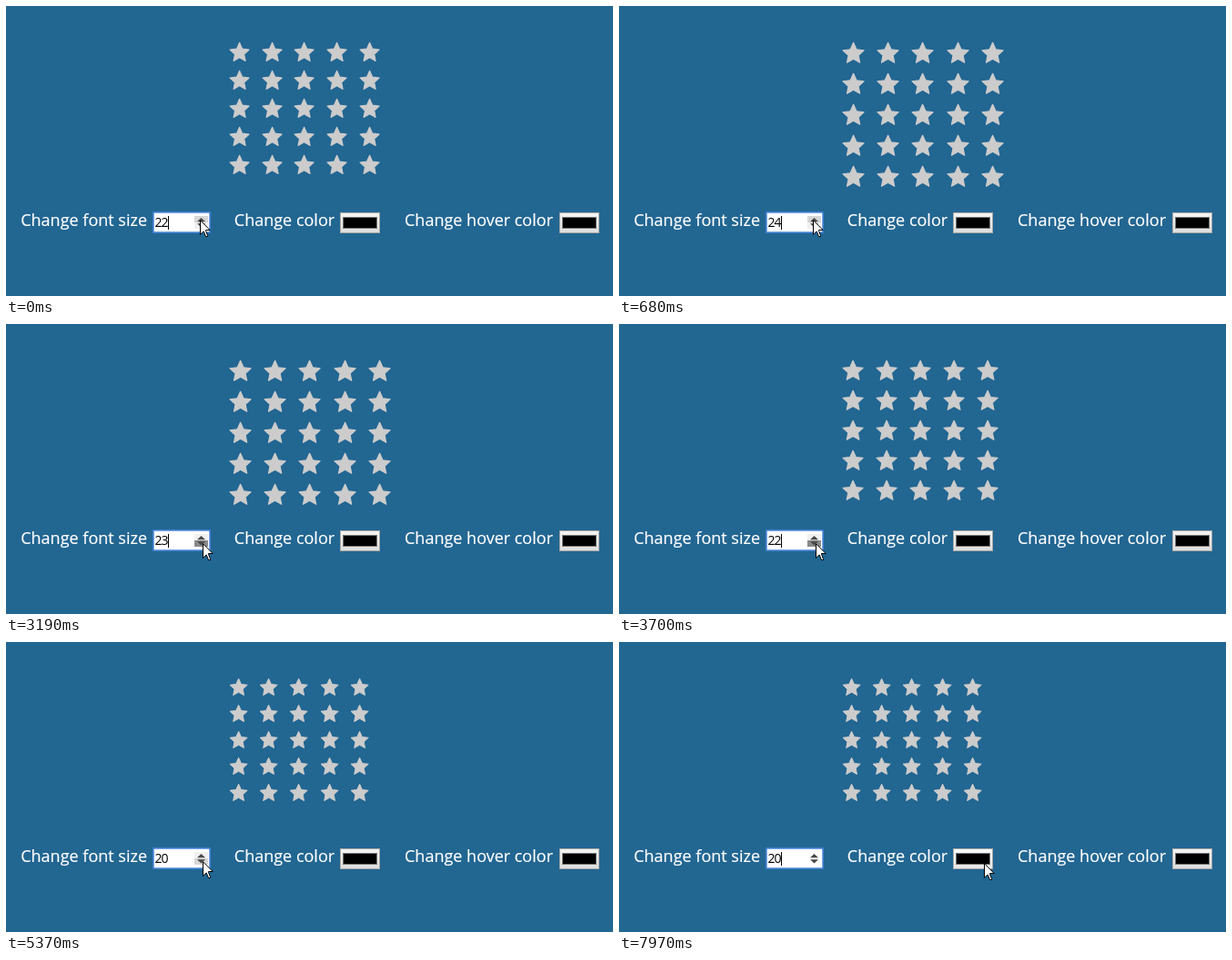
Recreate the animation shown at these times as an HTML page. Size 667 by 319 pixels, loop 8 s.

```html
<!DOCTYPE html>
<html lang="en">
<head>
<meta charset="utf-8">
<title>Star grid settings</title>
<style>
  html, body { margin: 0; width: 100%; height: 100%; overflow: hidden; background: #226692; }
  svg { display: block; width: 100%; height: 100%; }
  text { font-family: "Open Sans", "Noto Sans", sans-serif; white-space: pre; }
  .label { font-size: 18px; fill: #fff; stroke: #fff; stroke-width: .2px; }
  .value { font-size: 14px; letter-spacing: -1px; fill: #000; }
</style>
</head>
<body>
<svg viewBox="0 0 667 319">
  <defs>
    <linearGradient id="face" x2="0" y2="1">
      <stop offset="0" stop-color="#f4f4f3"/>
      <stop offset="1" stop-color="#dededc"/>
    </linearGradient>
    <linearGradient id="faceHover" x2="0" y2="1">
      <stop offset="0" stop-color="#fafaf9"/>
      <stop offset="1" stop-color="#e8e8e6"/>
    </linearGradient>
    <g id="swatch">
      <rect x=".5" y=".5" width="43" height="22" stroke="#a9a9a8"/>
      <rect x="3.5" y="5.5" width="37" height="12" fill="#000" stroke="#777"/>
    </g>
    <path id="star"/>
  </defs>

  <g id="stars" fill="#ccc" stroke="#ccc" stroke-width=".05" stroke-linejoin="round"></g>

  <text class="label" x="16.2" y="242">Change font size</text>
  <text class="label" x="250.8" y="242">Change color</text>
  <text class="label" x="438" y="242">Change hover color</text>

  <rect x="162" y="227" width="62" height="22" fill="#fff" stroke="#4a87de" stroke-width="1.5"/>
  <text class="value" id="value" x="163.4" y="243"></text>
  <rect id="caret" x="178" y="231" width="1" height="15"/>
  <rect id="upper" x="207" y="231" width="15" height="7"/>
  <rect id="lower" x="207" y="238" width="15" height="7"/>
  <path d="M210 237.2L214.5 233 219 237.2ZM210 239.3H219L214.5 243.5Z" fill="#484848"/>

  <use id="color" href="#swatch" x="367" y="227"/>
  <use href="#swatch" x="608" y="227" fill="url(#face)"/>

  <path id="cursor" fill="#fff" stroke="#000"
    d="M.5 .8V16.3L4.2 12.9 6.5 18.5H8.5V17.3L6.5 12.4V11.5H11.2Z"/>
</svg>
<script>
const LOOP = 8000, HOLD = 140, BLINK = 535;
const TO_LOWER = 2640;                        // pointer drops to the lower button
const LEAVE = 6960, HOP = 144, HOPS = 7;      // pointer travels to the swatch
const $ = id => document.getElementById(id);
const each = (count, make) => Array.from({ length: count }, (_, i) => make(i));

const clicks = [
  ...each(2, i => ({ start: 110 + 430 * i, by: 1 })),
  ...each(4, i => ({ start: 3170 + 530 * i, by: -1 })),
];
const valueAt = t => clicks.reduce((v, c) => t >= c.start ? v + c.by : v, 22);
const lastClick = t => clicks.reduce((s, c) => t >= c.start ? c.start : s, 0);

// Five-pointed star about one unit wide, with its top near 0.
const R = 0.505;
$('star').setAttribute('d', 'M' + each(10, i => {
  const r = i % 2 ? R * 0.48 : R, a = i * Math.PI / 5;
  return [r * Math.sin(a), R + 0.015 - r * Math.cos(a)].map(n => n.toFixed(4));
}).join('L') + 'Z');

const stars = each(25, () => {
  const use = document.createElementNS('http://www.w3.org/2000/svg', 'use');
  use.setAttribute('href', '#star');
  return $('stars').appendChild(use);
});

function layout(size) {
  const dx = 8.25 + 1.25 * size, dy = Math.round(size / 0.7);
  stars.forEach((star, i) => {
    const x = 245.6 + size / 2 + Math.ceil(i % 5 * dx - 0.5);
    const y = 40 + Math.floor(i / 5) * dy;
    star.setAttribute('transform', `translate(${x} ${y}) scale(${size})`);
  });
}

// The pointer hops along a sagging, eased arc.
function pointer(t, hop) {
  if (t < TO_LOWER) return [213, 235];
  const p = hop / HOPS;
  return [216 + 185 * p * p * (3 - 2 * p), 241 + 2 * p + 37 * Math.sin(Math.PI * p)].map(Math.round);
}

let shown;
function draw(now) {
  const t = now % LOOP;
  const value = valueAt(t), size = valueAt(t - HOLD);
  const hop = Math.min(HOPS, Math.max(0, Math.floor((t - LEAVE) / HOP)));

  if (size !== shown) layout(shown = size);
  $('value').textContent = value;
  $('caret').style.opacity = 1 - Math.floor((t - lastClick(t)) / BLINK) % 2;
  $('cursor').setAttribute('transform', `translate(${pointer(t, hop)})`);

  const active = value !== size ? '#8a8a8a' : '#d6d6d8', idle = '#f0f0f0';
  const low = t >= TO_LOWER;
  $('upper').setAttribute('fill', hop ? 'none' : low ? idle : active);
  $('lower').setAttribute('fill', hop ? 'none' : low ? active : idle);
  $('color').setAttribute('fill', hop === HOPS ? 'url(#faceHover)' : 'url(#face)');
}

const begin = performance.now();
function tick() {
  draw(performance.now() - begin);
  requestAnimationFrame(tick);
}
tick();
</script>
</body>
</html>
```
